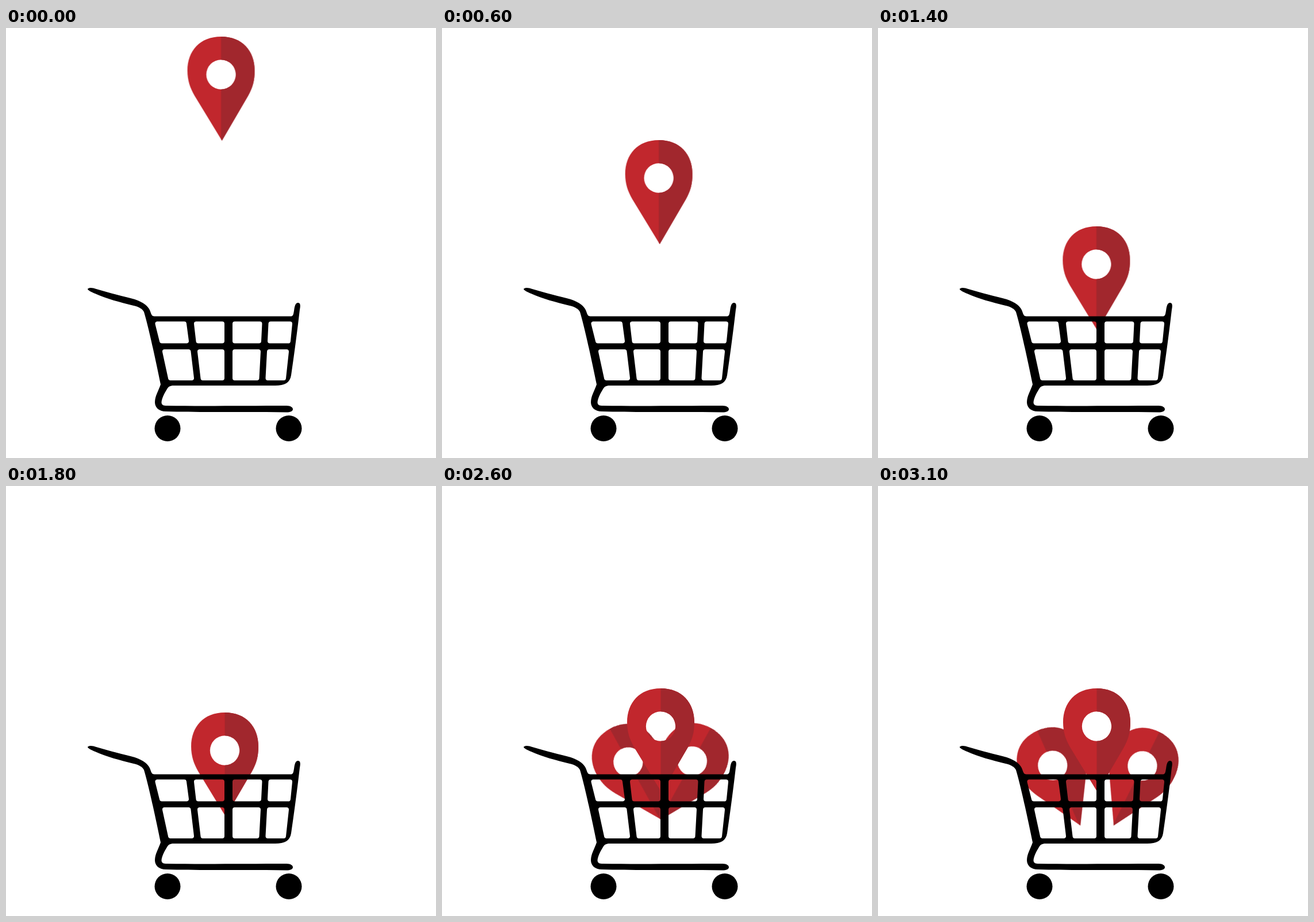
These frames come from a looping animation (748x748 px, 3200 ms). An HTML page:

```html
<!DOCTYPE html>
<html lang="en">
<head>
<meta charset="utf-8">
<title>Pins in a cart</title>
<style>
  html, body { margin: 0; width: 100%; height: 100%; overflow: hidden; background: #fff; }
  svg { display: block; width: 100vw; height: 100vh; }

  /* Each pin is positioned by its tip; the loop advances in 100 ms steps (3.125%). */
  .pin { transform-origin: 0 0; transform-box: view-box; animation: 3200ms infinite; }
  .centre { animation-name: centre; }
  .left { animation-name: left; }
  .right { animation-name: right; }

  @keyframes centre {
    0%      { transform: translate(375.6px, 196px); animation-timing-function: steps(7); }
    21.875% { transform: translate(379.2px, 406px); animation-timing-function: steps(4); }
    34.375% { transform: translate(380.8px, 486px); animation-timing-function: steps(6); }
    53.125% { transform: translate(382px, 566px); animation-timing-function: steps(2); }
    59.375% { transform: translate(382.2px, 584px); animation-timing-function: steps(2); }
    65.625% { transform: translate(382.2px, 584px); animation-timing-function: steps(1); }
    68.75%  { transform: translate(382.2px, 574px); animation-timing-function: steps(2); }
    75%     { transform: translate(382.1px, 543px); animation-timing-function: steps(1); }
    78.125% { transform: translate(382px, 533px); animation-timing-function: steps(1); }
    81.25%  { transform: translate(382px, 533px); animation-timing-function: steps(4); }
    93.75%  { transform: translate(382px, 548px); animation-timing-function: steps(1); }
    96.875%, 100% { transform: translate(382px, 533px); }
  }
  @keyframes left {
    0%     { opacity: 0; transform: translate(381px, 584px) rotate(0deg); animation-timing-function: steps(1); }
    62.5%  { opacity: 1; transform: translate(381px, 584px) rotate(0deg); animation-timing-function: steps(2); }
    68.75% { opacity: 1; transform: translate(381px, 584px) rotate(-7.7deg); animation-timing-function: steps(4); }
    81.25% { opacity: 1; transform: translate(381px, 580px) rotate(-29deg); animation-timing-function: steps(4); }
    93.75%, 100% { opacity: 1; transform: translate(352px, 590.5px) rotate(-24deg); }
  }
  @keyframes right {
    0%     { opacity: 0; transform: translate(381px, 584px) rotate(0deg); animation-timing-function: steps(1); }
    62.5%  { opacity: 1; transform: translate(381px, 584px) rotate(0deg); animation-timing-function: steps(2); }
    68.75% { opacity: 1; transform: translate(381px, 584px) rotate(8.7deg); animation-timing-function: steps(4); }
    81.25% { opacity: 1; transform: translate(381px, 580px) rotate(29deg); animation-timing-function: steps(4); }
    93.75%, 100% { opacity: 1; transform: translate(410px, 590.5px) rotate(26.5deg); }
  }
</style>
</head>
<body>
<svg viewBox="0 0 748 748">
  <defs>
    <g id="pin" fill-rule="evenodd">
      <path fill="#c1272d" d="M-1.5-181C-38.5-181-60-156-60-122C-60-105-55.5-92-47.5-78L0 0L45.5-78C53.5-92 57-105 57-122C57-156 35.5-181-1.5-181Z
        M-1.5-140.7a25.7 25.7 0 0 1 0 51.4a25.7 25.7 0 0 1 0-51.4Z"/>
      <path fill="#a1272d" d="M-1.5-181C35.5-181 57-156 57-122C57-105 53.5-92 45.5-78L0 0L-1.5-2.5Z
        M-1.5-140.7a25.7 25.7 0 0 1 0 51.4Z"/>
    </g>
    <mask id="grid" maskUnits="userSpaceOnUse" x="0" y="0" width="748" height="748">
      <path fill="#fff" d="M0 0H748V748H0Z"/>
      <path stroke="#000" stroke-width="8" stroke-linejoin="round" d="
        M263.5 514.5H310L314 544.5H271Z
        M331 514.5H376V544.5H334.5Z
        M398 514.5H441.5L440 544.5H398Z
        M460.5 514.5H494L491 544.5H459Z
        M276 563H317.5L323 609H286Z
        M337 563H376V609H342.5Z
        M398 563H439L436.5 609H398Z
        M458 563H488L483 609H455.5Z"/>
    </mask>
  </defs>

  <use href="#pin" class="pin left"/>
  <use href="#pin" class="pin right"/>
  <use href="#pin" class="pin centre"/>

  <path mask="url(#grid)" d="M142 454C145 451 151 452 157 454C180 461 205 467 224 472C239 477 248 484 251 493
    C253 499 254 501.5 258 501.5H496C500 501 500 497 501 492C502 485 503 478 508 478C513 478 512 485 511 490
    C507 525 501 570 496 604C494 617 485 622 468 622H292C285 622 282 624 279 630C275 636 271 645 270.5 651
    C270.5 656 274 657 280 657C340 658 420 657 488 657C495 657 499 660 499 663C499 667 494 668.5 488 668.5
    C420 667 340 669 278 667C266 667 259 660 259 651C259 640 265 632 269 620C263 590 248 520 240 494
    C238 489 231 485 222 483C198 477 175 471 155 462C148 459 142 456 142 454Z"/>
  <circle cx="281" cy="696.5" r="22.5"/>
  <circle cx="492" cy="696.5" r="22.5"/>
</svg>
</body>
</html>
```
